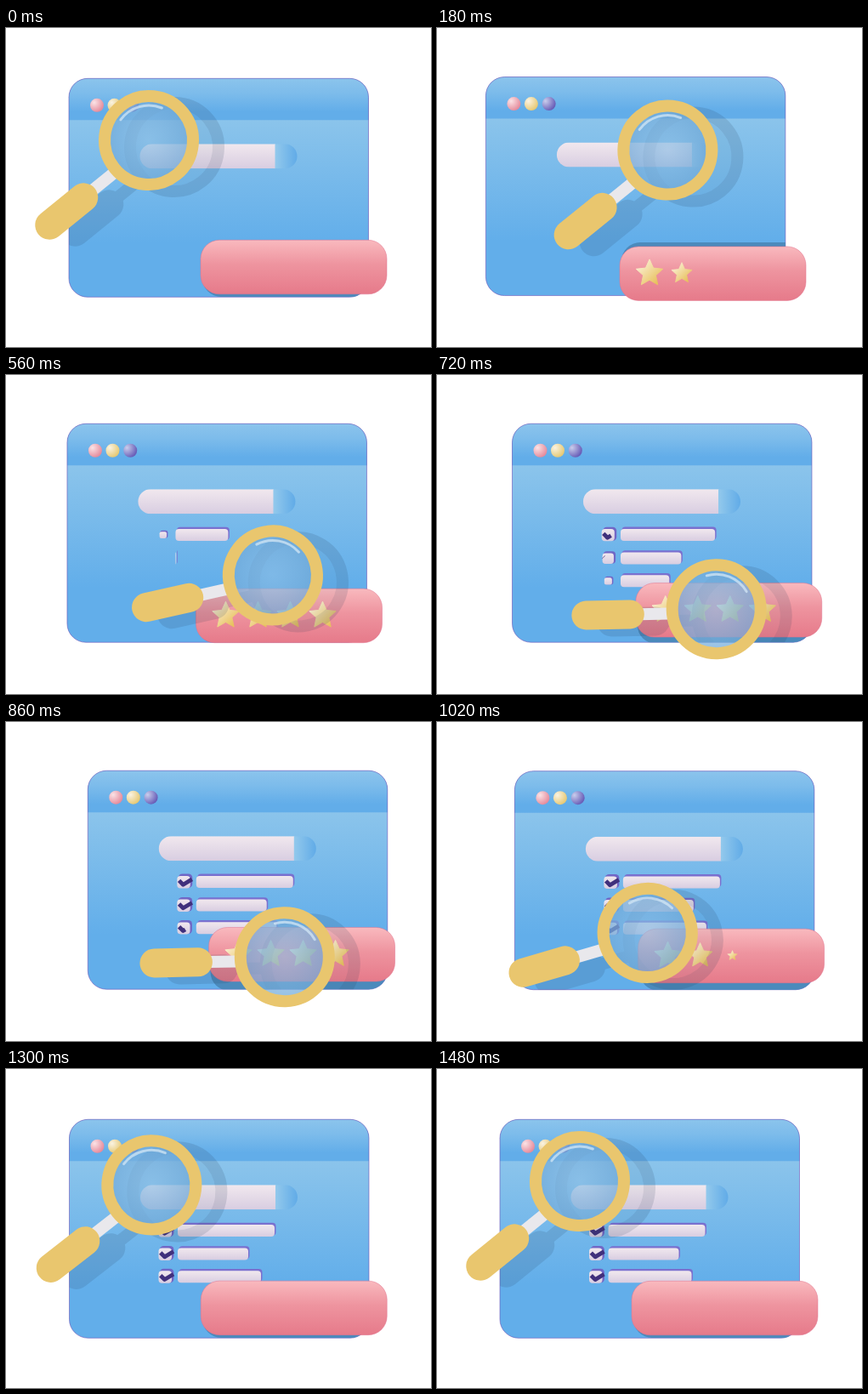
These frames come from a looping animation (500x375 px, 1500 ms). An HTML page:

```html
<!DOCTYPE html>
<html lang="en">
<head>
<meta charset="utf-8">
<title>Search window</title>
<style>
  html, body { margin: 0; width: 100%; height: 100%; overflow: hidden; background: #fff; }
  svg { display: block; width: 100vw; height: 100vh; }
</style>
</head>
<body>
<svg viewBox="0 0 500 375" xmlns="http://www.w3.org/2000/svg">
  <defs>
    <linearGradient id="head" x2="0" y2="1">
      <stop offset="0" stop-color="#8bc4ec"/><stop offset=".35" stop-color="#7dbceb"/><stop offset=".8" stop-color="#62ade9"/><stop offset="1" stop-color="#62ade9"/>
    </linearGradient>
    <linearGradient id="body" x2="0" y2="1">
      <stop offset=".19" stop-color="#8bc4eb"/><stop offset=".75" stop-color="#62aeea"/><stop offset="1" stop-color="#62aeea"/>
    </linearGradient>
    <linearGradient id="pale" x2="0" y2="1">
      <stop offset="0" stop-color="#f1e8ee"/><stop offset="1" stop-color="#d8cde1"/>
    </linearGradient>
    <linearGradient id="button">
      <stop offset="0" stop-color="#93c9ec"/><stop offset="1" stop-color="#5faae7"/>
    </linearGradient>
    <linearGradient id="rose" x2="0" y2="1">
      <stop offset="0" stop-color="#f9b9be"/><stop offset=".45" stop-color="#ee949f"/><stop offset="1" stop-color="#e67a8a"/>
    </linearGradient>
    <linearGradient id="gold" x2="1" y2="1">
      <stop offset=".1" stop-color="#fbf2da"/><stop offset=".85" stop-color="#e8c15e"/>
    </linearGradient>
    <radialGradient id="glass">
      <stop offset="0" stop-color="#8fc2ea" stop-opacity=".62"/><stop offset="1" stop-color="#74acda" stop-opacity=".74"/>
    </radialGradient>
    <radialGradient id="dot0" cx=".3" cy=".3" r=".75">
      <stop offset="0" stop-color="#fbe3e6"/><stop offset="1" stop-color="#e58a9b"/>
    </radialGradient>
    <radialGradient id="dot1" cx=".3" cy=".3" r=".75">
      <stop offset="0" stop-color="#faf3e2"/><stop offset="1" stop-color="#e6c872"/>
    </radialGradient>
    <radialGradient id="dot2" cx=".25" cy=".3" r=".75">
      <stop offset="0" stop-color="#c9cdec"/><stop offset="1" stop-color="#6a5fb8"/>
    </radialGradient>
    <clipPath id="pill"><rect x="83.5" y="77" width="185" height="29" rx="14.5"/></clipPath>
    <clipPath id="frame"><rect id="frameBox" width="352.5" height="257" rx="22"/></clipPath>
    <clipPath id="solid">
      <rect id="solidBox" width="352.5" height="257" rx="22"/>
      <rect id="solidCard" width="219" height="63.5" rx="22"/>
    </clipPath>
    <g id="handle">
      <path d="M-90 4H-57" stroke-width="14"/>
      <path d="M-153.5 4H-102" stroke-width="34" stroke-linecap="round"/>
    </g>
  </defs>

  <g id="win">
    <rect width="352.5" height="257" rx="22" fill="url(#body)"/>
    <path d="M0 49V22A22 22 0 0 1 22 0H330.5A22 22 0 0 1 352.5 22V49Z" fill="url(#head)"/>
    <rect width="352.5" height="257" rx="22" fill="none" stroke="#6a52b8" stroke-width=".8" stroke-opacity=".75"/>
    <circle cx="33" cy="31.5" r="8" fill="url(#dot0)"/>
    <circle cx="53.5" cy="31.5" r="8" fill="url(#dot1)"/>
    <circle cx="74.3" cy="31.5" r="8" fill="url(#dot2)"/>
    <g clip-path="url(#pill)">
      <rect x="83" y="77" width="160" height="29" fill="url(#pale)"/>
      <rect x="242.5" y="77" width="27" height="29" fill="url(#button)"/>
    </g>
    <g id="rows"></g>
  </g>

  <g clip-path="url(#frame)">
    <rect id="cardShade" width="219" height="64" rx="22" fill="#4b8abc"/>
  </g>
  <g id="card">
    <rect width="219" height="63.5" rx="22" fill="url(#rose)" stroke="#e0708c" stroke-width=".5"/>
    <g id="stars"></g>
  </g>

  <g clip-path="url(#solid)">
    <g id="shade" opacity=".14" fill="none" stroke="#243c58">
      <use href="#handle"/>
      <circle r="52" stroke-width="14"/>
      <circle r="45" fill="#243c58" fill-opacity=".35" stroke="none"/>
    </g>
  </g>
  <g id="lens" fill="none">
    <path d="M-90 4H-57" stroke="#e9e8ec" stroke-width="14"/>
    <path d="M-153.5 4H-102" stroke="#e9c66e" stroke-width="34" stroke-linecap="round"/>
    <circle r="46" fill="url(#glass)"/>
    <path id="shine" stroke="#d3e7f6" stroke-opacity=".75" stroke-width="3" stroke-linecap="round"/>
    <circle r="52" stroke="#e9c66e" stroke-width="14"/>
  </g>
</svg>
<script>
const LOOP = 1500, LAST = 1480;
const $ = id => document.getElementById(id);
const clamp = v => Math.min(1, Math.max(0, v));
const mix = (a, b, p) => a + (b - a) * p;
const place = (el, x, y, more = '') => el.setAttribute('transform', `translate(${x} ${y}) ${more}`);

function add(parent, tag, attrs) {
  const el = document.createElementNS('http://www.w3.org/2000/svg', tag);
  for (const k in attrs) el.setAttribute(k, attrs[k]);
  return parent.appendChild(el);
}

// Smooth step with a longer tail for larger skew
const ease = (u, skew) => (1 - Math.cos(Math.PI * (1 - (1 - u) ** skew))) / 2;

// Segment index and eased progress
function stage(t, times, skews) {
  let i = 0;
  while (i < skews.length - 1 && t >= times[i + 1]) i++;
  return [i, ease(clamp((t - times[i]) / (times[i + 1] - times[i])), skews[i])];
}

const FLOAT = { times: [0, 310, 925, LAST], skews: [1.67, 1.1, 2.1] };
const WIN_X = [74, 55, 97, 74], WIN_Y = [59.3, 57.3, 57.2, 59.3];
const CARD_X = [229, 213, 239, 229], CARD_Y = [249.3, 258, 241.2, 249.3];

// Pause at the lowest point, then a curved way back
const SWEEP = { times: [0, 254, 745, 845, LAST], skews: [1.38, 1, 1, 1.77] };
const TOP = [168, 132, -39], LOW = [329, 276, -1];
const LENS = [TOP, [280, 144.5, -39], LOW, LOW, TOP];
const BACK = [[246, 295], [208, 183]];

const ROWS = [{ y: 130.7, w: 114 }, { y: 158.3, w: 83 }, { y: 185, w: 98 }];
const ROW_START = 484, TICK_START = 642, ROW_GAP = 76;
const STARS_OUT = [1080, 1012, 955, 880];

const rows = ROWS.map(({ y }) => {
  const g = add($('rows'), 'g', {});
  const bars = ['#7a70cf', 'url(#pale)'].map((fill, i) =>
    add(g, 'rect', { x: i ? 127.5 : 129, y: i ? y - 7 : y - 9.3, height: i ? 14 : 15, rx: 4, fill }));
  const box = add(g, 'g', {});
  add(box, 'rect', { x: -6.5, y: -9.5, width: 16.5, height: 16.5, rx: 4.5, fill: '#7167c6' });
  add(box, 'rect', { x: -8, y: -7, width: 15.5, height: 14.5, rx: 4, fill: 'url(#pale)' });
  const tick = add(g, 'path', {
    d: `M107.3 ${y - 1.5}l4.8 4.8l10.4 -6.3`, fill: 'none', stroke: '#40307c',
    'stroke-width': 4.8, 'stroke-linejoin': 'round', pathLength: 1
  });
  return { g, bars, box, tick };
});

const starPoints = Array.from({ length: 10 }, (_, i) => {
  const r = i % 2 ? 7.8 : 16.5, a = (i / 5 - .5) * Math.PI;
  return [r * Math.cos(a), r * Math.sin(a)].map(v => v.toFixed(2)).join();
}).join(' ');
const stars = STARS_OUT.map(() => add($('stars'), 'polygon', {
  points: starPoints, fill: 'url(#gold)', stroke: 'url(#gold)', 'stroke-linejoin': 'round'
}));

const onArc = deg => [41 * Math.cos(deg * Math.PI / 180), 41 * Math.sin(deg * Math.PI / 180)].join(' ');
$('shine').setAttribute('d', `M${onArc(-105)}A41 41 0 0 1 ${onArc(-29)}`);

const bezier = (a, b, c, d, p) => {
  const q = 1 - p;
  return q * q * q * a + 3 * q * q * p * b + 3 * q * p * p * c + p * p * p * d;
};

function drawPanels(t) {
  const [i, p] = stage(t, FLOAT.times, FLOAT.skews);
  const at = list => mix(list[i], list[i + 1], p);
  const x = at(WIN_X), y = at(WIN_Y), cx = at(CARD_X), cy = at(CARD_Y);
  ['win', 'frameBox', 'solidBox'].forEach(id => place($(id), x, y));
  ['card', 'solidCard'].forEach(id => place($(id), cx, cy));
  place($('cardShade'), cx + 2, 252);
}

function drawRows(t) {
  rows.forEach(({ g, bars, box, tick }, i) => {
    const { y, w } = ROWS[i], delay = ROW_GAP * i;
    const p = 1 - (1 - clamp((t - ROW_START - delay) / 335)) ** 3;
    g.setAttribute('display', p > 0 ? 'inline' : 'none');
    bars.forEach(b => b.setAttribute('width', w * p));
    place(box, 113, y, `scale(${p})`);
    const drawn = clamp((t - TICK_START - delay) / 130);
    tick.setAttribute('stroke-dasharray', `${drawn} 2`);
    tick.setAttribute('display', drawn > 0 ? 'inline' : 'none');
  });
}

function drawStars(t) {
  stars.forEach((el, i) => {
    const s = clamp((t - 20 - 80 * i) / 105) * (1 - clamp((t - STARS_OUT[i]) / 105));
    place(el, 35 + 38 * i, 31.5, `scale(${s})`);
  });
}

function drawLens(t) {
  const [i, p] = stage(t, SWEEP.times, SWEEP.skews);
  const a = LENS[i], b = LENS[i + 1];
  const [x, y] = [0, 1].map(k => i < 3
    ? mix(a[k], b[k], p)
    : bezier(a[k], BACK[0][k], BACK[1][k], b[k], p));
  const turn = `rotate(${mix(a[2], b[2], p)})`;
  place($('lens'), x, y, turn);
  place($('shade'), x + 30, y + 8, turn);
}

const begin = performance.now();
function draw(now) {
  const t = Math.min(Math.max(0, now - begin) % LOOP, LAST);
  drawPanels(t);
  drawRows(t);
  drawStars(t);
  drawLens(t);
  requestAnimationFrame(draw);
}
draw(begin);
</script>
</body>
</html>
```
